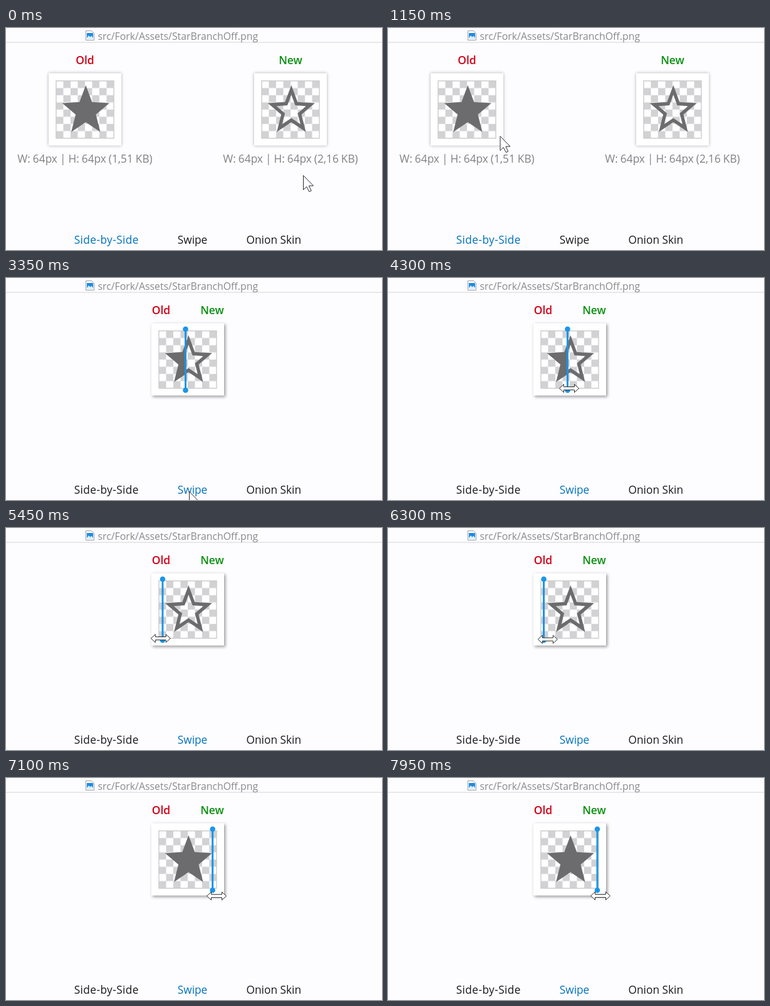
An HTML page for the animation above (8000 ms loop, 600x356 px).

```html
<!DOCTYPE html>
<html lang="en">
<head>
<meta charset="utf-8">
<title>Image diff modes</title>
<style>
  html, body { margin: 0; width: 100%; height: 100%; overflow: hidden; background: #fdfcfe; }
  svg { display: block; }
  text { font: 17.3px "Open Sans", "Noto Sans", sans-serif; fill: #828284; text-anchor: middle; }
  .path { font-size: 15.85px; text-anchor: start; fill: #89898b; }
  .size { word-spacing: -.5px; }
  .old, .new { font-weight: 600; font-size: 17.5px; }
  .old { fill: #cf0218; }
  .new { fill: #0a9011; }
  .tab { fill: #19191b; }
  .tab.active { fill: #0072bd; }
  .card { fill: #fff; filter: drop-shadow(0 .5px 2.5px rgba(0, 0, 0, .32)); }
  #swipe .card { filter: drop-shadow(2px 2px 2.5px rgba(0, 0, 0, .42)); }
  .star { fill: #6c6b6d; fill-rule: evenodd; filter: blur(.7px); }
  .cursor { fill: #fff; stroke: #2a2a2a; }
  #handle { fill: #1a95e8; }
</style>
</head>
<body>
<svg width="600" height="356" viewBox="0 0 600 356">
  <defs>
    <pattern id="checker" width="23" height="23" patternUnits="userSpaceOnUse" patternTransform="translate(12 12.300)">
      <rect width="23" height="23" fill="#fff"/>
      <path d="M11.5 0H23V11.5H11.5ZM0 11.5H11.5V23H0Z" fill="#d2d1d3"/>
    </pattern>
    <g id="paper">
      <rect width="116" height="116"/>
      <rect x="12" y="12.300" width="92" height="92" fill="url(#checker)" stroke="#cbcacc" stroke-width="1.4"/>
    </g>
    <path id="solid" class="star"/>
    <path id="hollow" class="star"/>
    <clipPath id="left"><rect id="leftBox" height="116"/></clipPath>
    <clipPath id="right"><rect id="rightBox" width="116" height="116"/></clipPath>
  </defs>

  <rect width="600" height="356" fill="#fdfcfe"/>
  <rect y="22.5" width="600" height="1" fill="#d3d3d7"/>
  <path d="M127.5 4.5H136.5L140.5 8.5V19.5H127.5Z" fill="#fff" stroke="#9a9fa6"/>
  <path d="M129 8H139V18H129Z" fill="#1d8be0"/>
  <path d="M129 16L132 12L134.5 14.5L136.5 12.5L139 16V18H129Z" fill="#d9efff"/>
  <text class="path" x="146.500" y="18.5">src/Fork/Assets/StarBranchOff.png</text>

  <g id="side">
    <text class="old" x="126" y="57.500">Old</text>
    <text class="new" x="454" y="57.500">New</text>
    <g transform="translate(68 72.500)"><use class="card" href="#paper"/><use href="#solid"/></g>
    <g transform="translate(396 72.500)"><use class="card" href="#paper"/><use href="#hollow"/></g>
    <text class="size" x="126" y="216">W: 64px | H: 64px (1,51 KB)</text>
    <text class="size" x="454" y="216">W: 64px | H: 64px (2,16 KB)</text>
  </g>

  <g id="swipe">
    <text class="old" x="247.500" y="57.500">Old</text>
    <text class="new" x="329" y="57.500">New</text>
    <g transform="translate(232 72.500)">
      <use class="card" href="#paper"/>
      <g clip-path="url(#left)"><use href="#solid"/></g>
      <g clip-path="url(#right)"><use href="#hollow"/></g>
    </g>
    <g id="handle">
      <rect x="-1.5" y="82" width="3" height="98"/>
      <circle cy="82" r="4.300"/>
      <circle cy="180" r="4.300"/>
    </g>
  </g>

  <text class="tab" id="sideTab" x="160.300" y="346" letter-spacing=".4">Side-by-Side</text>
  <text class="tab" id="swipeTab" x="297.500" y="346">Swipe</text>
  <text class="tab" x="427.300" y="346">Onion Skin</text>

  <path id="arrow" class="cursor" d="M.5 .5V23.500L5.700 18.500L9.800 26.500L13.200 25L9.400 17H16.500Z"/>
  <path id="resize" class="cursor" d="M-15.500 0L-8.500 -6.500V-2.500H8.500V-6.500L15.500 0L8.500 6.500V2.500H-8.500V6.500Z"/>
</svg>
<script>
const LOOP = 8000, STEP = 50, SWITCH = 3350, DRAG = 5050;
const $ = id => document.getElementById(id);

// Pointer stops: time, x, y
const stops = [
  [0, 474, 236], [600, 474, 236], [1150, 178.5, 173], [1280, 158, 203], [1400, 156, 236],
  [2050, 292, 342], [3750, 292, 342], [4300, 289, 177], [4500, 288, 177], [DRAG, 288, 177],
  [5550, 242, 177], [6050, 242, 177], [6700, 298, 184], [6850, 314, 186],
  [7450, 354, 192], [7750, 353, 192], [7950, 339, 189], [LOOP, 335, 188]
];

const slope = (i, axis) => stops[i + 1] && stops[i]
  ? (stops[i + 1][axis] - stops[i][axis]) / (stops[i + 1][0] - stops[i][0]) : 0;

// Harmonic tangents keep the curve from overshooting at rests and turns
function tangent(i, axis) {
  const a = slope(i - 1, axis), b = slope(i, axis);
  return a * b > 0 ? 2 * a * b / (a + b) : 0;
}

function pointer(t, axis) {
  const i = Math.max(0, stops.findIndex(s => s[0] > t) - 1);
  const [from, to] = [stops[i], stops[i + 1]];
  const span = to[0] - from[0], u = (t - from[0]) / span, v = 1 - u;
  return from[axis] * v * v * (1 + 2 * u) + to[axis] * u * u * (1 + 2 * v)
    + span * u * v * (v * tangent(i, axis) - u * tangent(i + 1, axis));
}

// The star is slightly taller than a regular one
function starPath(scale) {
  const points = Array.from({ length: 10 }, (_, i) => {
    const r = (i % 2 ? 17 : 39.5) * scale, a = i * Math.PI / 5;
    return `${59.3 + r * Math.sin(a)} ${60.7 - 1.05 * r * Math.cos(a)}`;
  });
  return `M${points.join('L')}Z`;
}

const show = (id, on) => $(id).setAttribute('display', on ? 'inline' : 'none');
const move = (id, x, y) => $(id).setAttribute('transform', `translate(${x} ${y})`);

function draw(t) {
  const swiping = t >= SWITCH;
  show('side', !swiping);
  show('swipe', swiping);
  $('sideTab').classList.toggle('active', !swiping);
  $('swipeTab').classList.toggle('active', swiping);

  // The divider trails the pointer by one step
  const split = t < DRAG ? 286.5 : Math.min(334, Math.max(248, pointer(t - STEP, 1) - 2));
  move('handle', split, 0);
  $('leftBox').setAttribute('width', split - 232);
  $('rightBox').setAttribute('x', split - 232);

  const x = pointer(t, 1), y = pointer(t, 2), resizing = swiping && y < 195;
  show('arrow', !resizing);
  show('resize', resizing);
  move(resizing ? 'resize' : 'arrow', x, y);
}

function tick() {
  const t = performance.now() % LOOP;
  draw(t - t % STEP);
  requestAnimationFrame(tick);
}

$('solid').setAttribute('d', starPath(1));
$('hollow').setAttribute('d', starPath(1) + starPath(.63));
tick();
</script>
</body>
</html>
```
